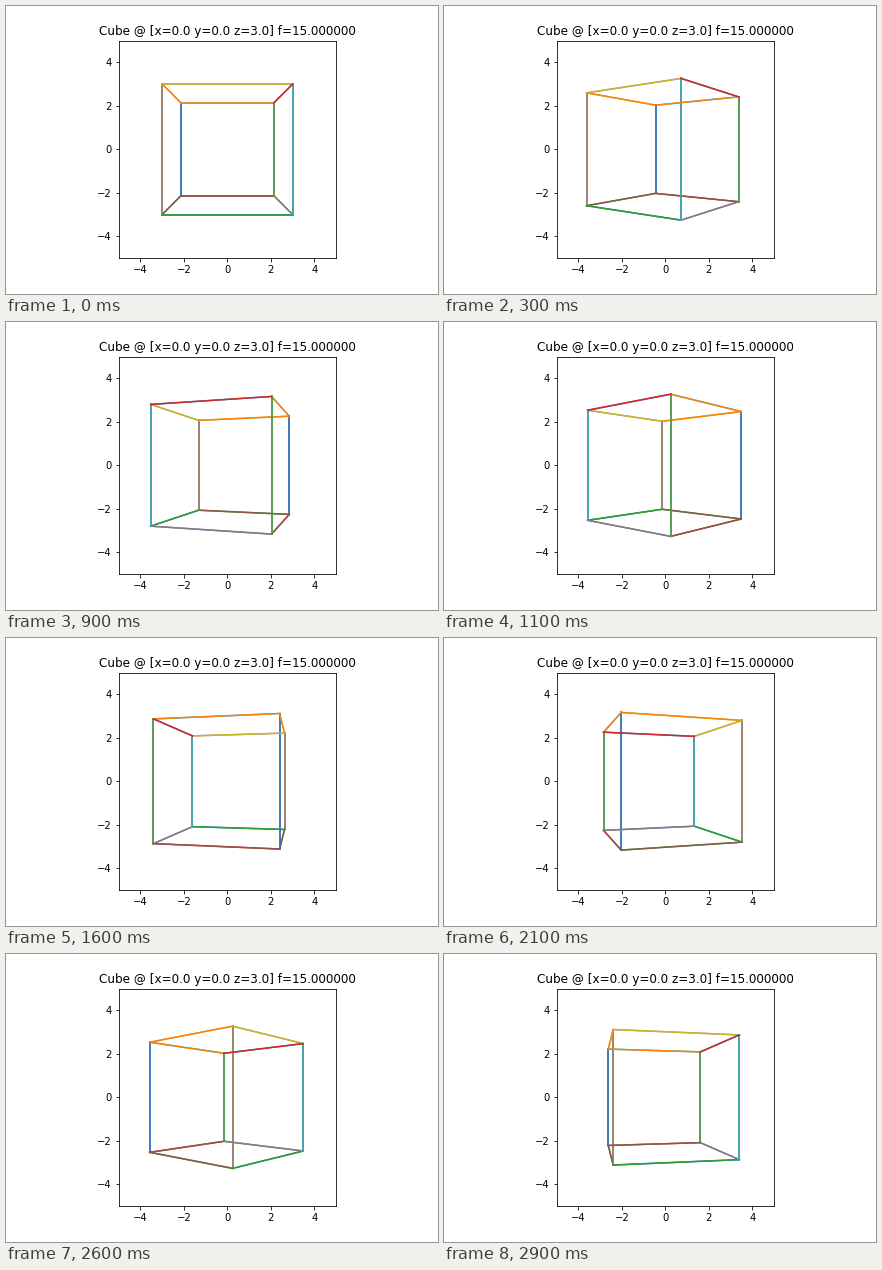
These frames come from a looping animation (432x288 px, 3 s). A matplotlib script:

```python
import itertools

import numpy as np
import matplotlib.pyplot as plt
from matplotlib.animation import FuncAnimation

FRAMES = 30
INTERVAL = 100
FOCAL = 15.0
CENTER = np.array([0.0, 0.0, 3.0])

# Corner bits are (right, top, back); every edge is drawn from both of its ends.
CORNERS = list(itertools.product((0, 1), repeat=3))
VERTICES = np.array(CORNERS) - 0.5
EDGES = [(i, i ^ bit) for i in range(8) for bit in (4, 2, 1)]


def rotate_y(points, angle):
    c, s = np.cos(angle), np.sin(angle)
    x, y, z = points.T
    return np.column_stack([c * x + s * z, y, c * z - s * x])


def project(points):
    return FOCAL * points[:, :2] / points[:, 2:]


plt.rcParams.update({"font.family": "DejaVu Sans", "font.size": 10})
fig, ax = plt.subplots(figsize=(6, 4), dpi=72)
fig.subplots_adjust(left=0.125, right=0.9, bottom=0.125, top=0.88)
ax.set_aspect("equal")
ax.set_xlim(-5, 5)
ax.set_ylim(-5, 5)
ax.set_xticks(range(-4, 5, 2))
ax.set_yticks(range(-4, 5, 2))
ax.set_title("Cube @ [x=%.1f y=%.1f z=%.1f] f=%f" % (*CENTER, FOCAL))

lines = [ax.plot([], [], color=f"C{k % 10}", lw=1.5)[0]
         for k in range(len(EDGES))]


def update(frame):
    angle = 2 * np.pi * frame / FRAMES
    flat = project(rotate_y(VERTICES, angle) + CENTER)
    for line, (start, end) in zip(lines, EDGES):
        line.set_data(flat[[start, end], 0], flat[[start, end], 1])
    return lines


anim = FuncAnimation(fig, update, frames=FRAMES, interval=INTERVAL,
                     repeat=True, repeat_delay=0)
plt.show()
```
